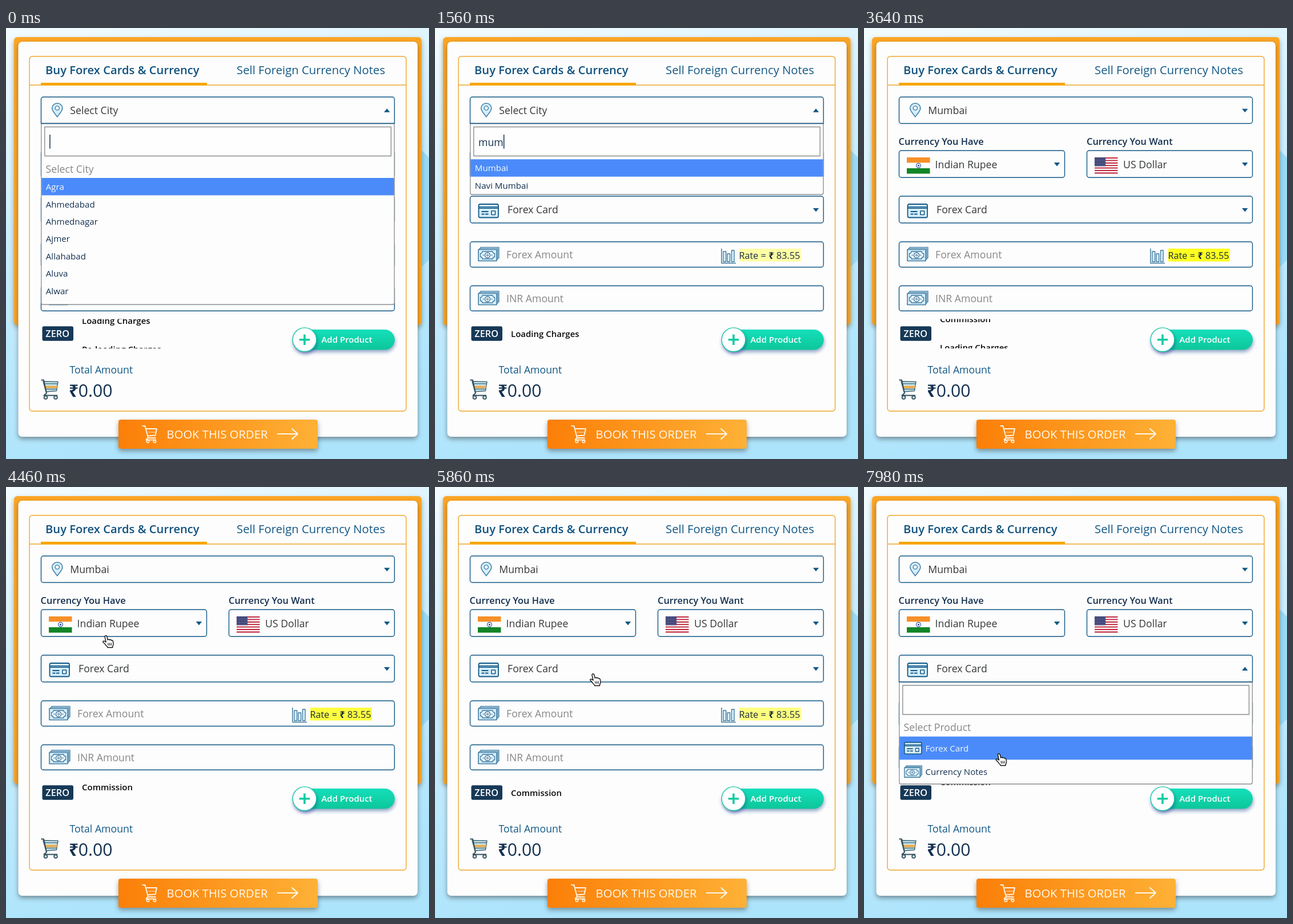
Recreate the animation shown at these times as an HTML page with a canvas. Size 741 by 756 pixels, loop 8000 ms.

```html
<!DOCTYPE html>
<html lang="en">
<head>
<meta charset="utf-8">
<title>Forex order form</title>
<style>
  html, body { margin: 0; width: 100%; height: 100%; overflow: hidden; background: #c4ecfd; }
  canvas { display: block; width: 741px; height: 756px; }
</style>
</head>
<body>
<canvas id="stage"></canvas>
<script>
const W = 741, H = 756, LOOP = 8000;
const canvas = document.getElementById('stage');
const ctx = canvas.getContext('2d');
const dpr = window.devicePixelRatio || 1;
canvas.width = W * dpr;
canvas.height = H * dpr;

const BLUE = '#125886', NAVY = '#14304f', INK = '#353739', GREY = '#878787';
const PAPER = '#fdfdfd', ORANGE = '#efa72d', SKY = '#d5eefb', PICK = '#4b8bf9';

const CITIES = ['Agra', 'Ahmedabad', 'Ahmednagar', 'Ajmer', 'Allahabad', 'Aluva', 'Alwar', 'Mumbai', 'Navi Mumbai'];
const CHARGES = ['Commission', 'Loading Charges', 'Re-loading Charges'];

// Timeline, in ms
const TYPING = [450, 800, 1150];
const CITY_CLOSE = 2200, PRODUCT_OPEN = 6450, POINTER_SHOW = 4000;
const CHARGE_KEYS = [[0, 73], [1217, 50], [2344, 50], [2820, 41], [4460, 10], [4990, 0], [6975, 0], [8000, 19.4]];
const GLOW_KEYS = [[0, 0.35], [1560, 0.35], [2820, 1], [4460, 0.75], [5860, 0.5], [8000, 0.35]];
const POINTER_X = [[4000, 163], [4460, 169], [5500, 271], [7050, 271], [7650, 230.5]];
const POINTER_Y = [[4000, 248], [4460, 260], [5500, 327], [7050, 327], [7650, 467]];

function track(keys, t) {
  if (t <= keys[0][0]) return keys[0][1];
  for (let i = 1; i < keys.length; i++) {
    const [t0, a] = keys[i - 1], [t1, b] = keys[i];
    if (t < t1) return a + (b - a) * (t - t0) / (t1 - t0);
  }
  return keys[keys.length - 1][1];
}

// y is the middle of the capitals
function text(str, x, y, size, color, weight = 400) {
  ctx.font = `${weight} ${size}px "Open Sans", "Noto Sans", sans-serif`;
  ctx.fillStyle = color;
  ctx.fillText(str, x, y + size * 0.357);
}

function box(x0, y0, x1, y1, r, fill, stroke, width = 1.4) {
  ctx.beginPath();
  ctx.roundRect(x0, y0, x1 - x0, y1 - y0, r);
  if (fill) { ctx.fillStyle = fill; ctx.fill(); }
  if (stroke) { ctx.strokeStyle = stroke; ctx.lineWidth = width; ctx.stroke(); }
}

function rect(x0, y0, x1, y1, fill) {
  ctx.fillStyle = fill;
  ctx.fillRect(x0, y0, x1 - x0, y1 - y0);
}

function path(d, stroke, width, fill) {
  const p = new Path2D(d);
  if (fill) { ctx.fillStyle = fill; ctx.fill(p); }
  if (stroke) { ctx.strokeStyle = stroke; ctx.lineWidth = width; ctx.stroke(p); }
}

function disc(x, y, r, fill, stroke, width) {
  ctx.beginPath();
  ctx.arc(x, y, r, 0, Math.PI * 2);
  if (fill) { ctx.fillStyle = fill; ctx.fill(); }
  if (stroke) { ctx.strokeStyle = stroke; ctx.lineWidth = width; ctx.stroke(); }
}

function shade(color, blur, dx, dy, draw) {
  ctx.save();
  ctx.shadowColor = color;
  ctx.shadowBlur = blur * dpr;
  ctx.shadowOffsetX = dx * dpr;
  ctx.shadowOffsetY = dy * dpr;
  draw();
  ctx.restore();
}

function at(x, y, scale, draw) {
  ctx.save();
  ctx.translate(x, y);
  ctx.scale(scale, scale);
  draw();
  ctx.restore();
}

function ramp(x0, y0, x1, y1, ...colors) {
  const g = ctx.createLinearGradient(x0, y0, x1, y1);
  colors.forEach((c, i) => g.addColorStop(i / (colors.length - 1), c));
  return g;
}

function arrow(x, y, up) {
  const s = up ? -1 : 1;
  path(`M${x - 5.2} ${y - 3 * s}h10.4l-5.2 ${6.4 * s}z`, null, 0, BLUE);
}

function pin() {
  path('M89.8 156C87 150.5 80.8 147 80.8 140.6a9 8.6 0 0 1 18 0C98.8 147 92.6 150.5 89.8 156z', '#3b7ca4', 1.5, SKY);
  disc(89.8, 140.5, 3.6, PAPER, '#3b7ca4', 1.4);
}

function cardIcon(x, y, scale) {
  at(x, y, scale, () => {
    box(1, 1, 35.5, 24.5, 2.5, SKY, BLUE, 1.8);
    rect(1, 5, 35.5, 9, BLUE);
    rect(2, 6.3, 34.5, 7.4, '#9cc4dc');
    rect(6, 13, 18, 15, BLUE);
    rect(6, 17.5, 11, 19.5, BLUE);
    rect(12.5, 17.5, 18, 19.5, BLUE);
    box(23.5, 13, 30, 19.5, 0.5, PAPER, BLUE, 1.6);
  });
}

function noteIcon(x, y, scale) {
  at(x, y, scale, () => {
    const line = '#39759c';
    box(5, 1, 37, 20, 0, SKY, line, 1.2);
    box(3, 3, 35, 22.5, 0, SKY, line, 1.2);
    box(1, 5, 33, 25, 0, SKY, line, 1.5);
    path('M8 8.5H26C26 11 27.5 12 29.5 12V18C27.5 18 26 19 26 21.5H8C8 19 6.5 18 4.5 18V12C6.5 12 8 11 8 8.5z', line, 1.3, '#eaf6fd');
    disc(17, 15, 4.6, PAPER, line, 1.5);
    disc(17, 15, 1.5, null, line, 1.2);
    disc(9.5, 15, 1, line);
    disc(24.5, 15, 1, line);
  });
}

function chartIcon() {
  path('M502 387V412.5H527', '#3e789d', 1.5);
  [[505, 392], [512, 396], [519.5, 390]].forEach(([x, y]) => box(x, y, x + 4.7, 410, 0, SKY, '#3e789d', 1.3));
}

function indiaFlag() {
  rect(75, 227, 115.5, 236.5, '#f78f27');
  rect(75, 236.5, 115.5, 246, '#ffffff');
  rect(75, 246, 115.5, 255.5, '#128526');
  disc(95.5, 241.3, 3.9, null, '#34559d', 1.2);
  disc(95.5, 241.3, 1.6, '#34559d');
}

function usFlag() {
  const h = 28.5 / 13;
  for (let i = 0; i < 13; i++) rect(404, 227 + i * h, 444.5, 227 + (i + 1) * h, i % 2 ? '#ffffff' : '#bf2b40');
  rect(404, 227, 423, 227 + 7 * h, '#353a70');
  for (let r = 0; r < 5; r++) {
    for (let c = 0; c < 6; c++) disc(406 + c * 3, 229 + r * 2.9, 0.6, '#d9dcec');
  }
}

function darkCart() {
  path('M65 620L91 620.5L88.5 636.5L70 638z', '#3f6474', 1.5, '#cde8ee');
  path('M67 627.5H90L89.2 632H68.3z', null, 0, '#e9ad55');
  path('M67 624H90M68 633.5H89', '#447181', 1.5);
  path('M61.5 617.5H66L71 640.5L66.5 644.5H90', '#35505c', 2);
  disc(69.5, 648, 2.9, '#cde8ee', '#35505c', 1.7);
  disc(87, 648, 2.9, '#cde8ee', '#35505c', 1.7);
}

function lightCart() {
  path('M238.5 698H243.5L249 719H262.5M245 703H264L261.5 714.5L248 715.5M248.5 719L245.5 722.5H263', '#fff3df', 2);
  path('M249 709H262', '#ffd9a0', 1.2);
  disc(248.5, 725.3, 2.2, null, '#fff3df', 1.6);
  disc(260.5, 725.3, 2.2, null, '#fff3df', 1.6);
}

function backdrop() {
  rect(0, 0, W, H, ramp(0, 0, 190, H, '#f3fcff', '#c9edfd', '#ace4fc'));
  disc(640, 317, 135, '#99daf6');
  shade('rgba(70,60,30,.45)', 8, 0, 4, () => box(14, 16, 728, 521, 6, '#fca524'));
  shade('rgba(50,50,50,.5)', 9, 0, 4, () => box(21.5, 24, 721, 717, 7, PAPER));
  box(41, 49.7, 701, 672, 5, null, ORANGE);
  rect(41, 99.3, 701, 100.8, ORANGE);
  rect(61, 96, 352, 100.8, '#f8a609');
  text('Buy Forex Cards & Currency', 69, 73.3, 20.2, '#10527f', 600);
  text('Sell Foreign Currency Notes', 404, 73.3, 20.3, BLUE);
}

function field(x0, y0, x1, y1, label, labelX, color, open) {
  box(x0, y0, x1, y1, open ? [4, 4, 0, 0] : 4, PAPER, BLUE);
  text(label, labelX, (y0 + y1) / 2 + 0.6, 17.7, color);
}

function fields(t, cityOpen, productOpen) {
  field(61.5, 121, 680.5, 167.5, t < CITY_CLOSE ? 'Select City' : 'Mumbai', 112.3, INK, cityOpen);
  pin();
  arrow(667.3, 144.7, cityOpen);

  text('Currency You Have', 60.6, 199, 16.4, NAVY, 600);
  text('Currency You Want', 390, 199, 16.4, NAVY, 600);
  field(61.5, 215, 351.5, 262.3, 'Indian Rupee', 124.6, INK);
  field(390.5, 215, 680.5, 262.3, 'US Dollar', 454, INK);
  indiaFlag();
  usFlag();
  arrow(338, 239);
  arrow(667.3, 239);

  field(61.5, 295, 680.5, 342, 'Forex Card', 127, INK, productOpen);
  cardIcon(75.5, 308, 1);
  arrow(667.3, 319, productOpen);

  field(61.5, 375, 680.5, 419.5, 'Forex Amount', 125, GREY);
  noteIcon(75, 383.5, 1);
  chartIcon();
  rect(533, 387, 641, 409.5, `rgba(255,255,0,${track(GLOW_KEYS, t)})`);
  text('Rate =', 532.5, 398.7, 16.3, '#1d2d3d');
  text('₹', 584.5, 398.7, 16.3, '#10202f', 700);
  text('83.55', 598, 398.7, 16.3, '#1d2d3d');

  field(61.5, 452.3, 680.5, 496.3, 'INR Amount', 125, GREY);
  noteIcon(75, 460.5, 1);
}

function footer(t) {
  box(63.5, 523.3, 118, 548.8, 3, '#163857');
  text('ZERO', 69.3, 536.3, 16.3, '#ffffff', 600);

  ctx.save();
  ctx.beginPath();
  ctx.rect(125, 510.5, 300, 51.5);
  ctx.clip();
  const shift = track(CHARGE_KEYS, t);
  CHARGES.forEach((name, i) => text(name, 133, 536.3 + i * 50 - shift, 15, '#0b0b0b', 600));
  ctx.restore();

  const teal = ramp(0, 529, 0, 564, '#14dfba', '#0dc79a');
  shade('rgba(40,80,150,.5)', 6, 1, 4, () => box(506, 529, 681, 564.5, 17.7, teal));
  shade('rgba(40,60,150,.6)', 6, 1, 4, () => disc(523, 546.7, 21, '#ffffff'));
  disc(523, 546.7, 20.8, '#ffffff', '#16c9a4', 1.4);
  path('M513.8 546.7h18.4M523 537.5v18.4', '#12cba2', 3.6);
  text('Add Product', 552.4, 547, 15, '#ffffff', 600);

  text('Total Amount', 111.5, 599.7, 17.7, BLUE);
  darkCart();
  text('₹', 110, 636, 30, NAVY, 700);
  text('0.00', 126.8, 636, 30.2, NAVY);

  const fire = ramp(197, 0, 546, 0, '#fb7f08', '#feb136');
  shade('rgba(60,60,60,.5)', 8, 0, 4, () => box(197, 687, 546, 738, 4, fire));
  lightCart();
  text('BOOK THIS ORDER', 281.6, 713, 20.2, '#fffaf0');
  path('M475 712H510M500.5 702.5L511 712L500.5 721.5', '#fff8ea', 2.1);
}

function panel(y0, y1, query, caret) {
  box(61.8, y0, 680.3, y1, [0, 0, 3, 3], PAPER, '#8b8d90', 1.3);
  rect(61, y0 - 0.7, 681, y0 + 0.7, BLUE);
  box(67.8, y0 + 6, 674.5, y0 + 57, 0, '#fefefe', '#8d8d8d', 1.4);
  text(query, 76, y0 + 32.7, 17.7, NAVY);
  if (caret) {
    const x = 76.2 + (query ? ctx.measureText(query).width : 0);
    rect(x, y0 + 19.5, x + 1.5, y0 + 44, NAVY);
  }
}

function cityList(t) {
  const query = 'mum'.slice(0, TYPING.filter(k => t >= k).length);
  const found = CITIES.filter(c => c.toLowerCase().includes(query)).slice(0, 7);
  const top = query ? 230.3 : 263, row = 30.45;
  panel(167.5, query ? top + found.length * row + 0.8 : 485, query, true);
  if (!query) text('Select City', 69.5, 247.6, 17.7, GREY);
  rect(62.3, top, 679.8, top + row, PICK);
  found.forEach((c, i) => text(c, 69.8, top + row * (i + 0.5) + 0.5, 15.1, i ? NAVY : '#f4f8ff'));
}

function productList(t) {
  panel(342, 521, '', Math.floor((t - PRODUCT_OPEN) / 500) % 2 === 0);
  text('Select Product', 69.5, 422, 17.7, GREY);
  rect(62.3, 437.7, 679.8, 478.3, PICK);
  cardIcon(70, 447, 0.87);
  text('Forex Card', 107.5, 458.6, 15.1, '#f4f8ff');
  noteIcon(70, 488, 0.85);
  text('Currency Notes', 107.5, 499.6, 15.1, NAVY);
}

function pointer(t) {
  at(track(POINTER_X, t), track(POINTER_Y, t), 1, () => {
    path('M4 2.5C4 .5 7 0 7.6 2L9.2 8.2C9.5 6.8 11.8 6.6 12.3 8.2C13 7.2 15 7.4 15.3 9C16.3 8.4 18 8.8 18.3 10.5' +
      'L19 14.5C19 17 18.3 18 17.6 19.5V21.5H8.8L8.5 20.5C6.5 18.5 5 16.5 3.8 14.8C2.6 13.4 .8 12.6 .6 11.4' +
      'C.6 9.8 3 9.6 4.6 11L6 12z', '#111111', 1.4, '#ffffff');
    path('M9.6 13.5L10.2 18M12.4 13.5L12.7 18M15.2 13.5V18', '#111111', 1.1);
  });
}

function draw(t) {
  const cityOpen = t < CITY_CLOSE, productOpen = t >= PRODUCT_OPEN;
  ctx.setTransform(dpr, 0, 0, dpr, 0, 0);
  ctx.lineJoin = 'round';
  backdrop();
  fields(t, cityOpen, productOpen);
  footer(t);
  if (cityOpen) cityList(t);
  if (productOpen) productList(t);
  if (t >= POINTER_SHOW) pointer(t);
}

const start = performance.now();
function frame() {
  draw((performance.now() - start) % LOOP);
  requestAnimationFrame(frame);
}
frame();
</script>
</body>
</html>
```
